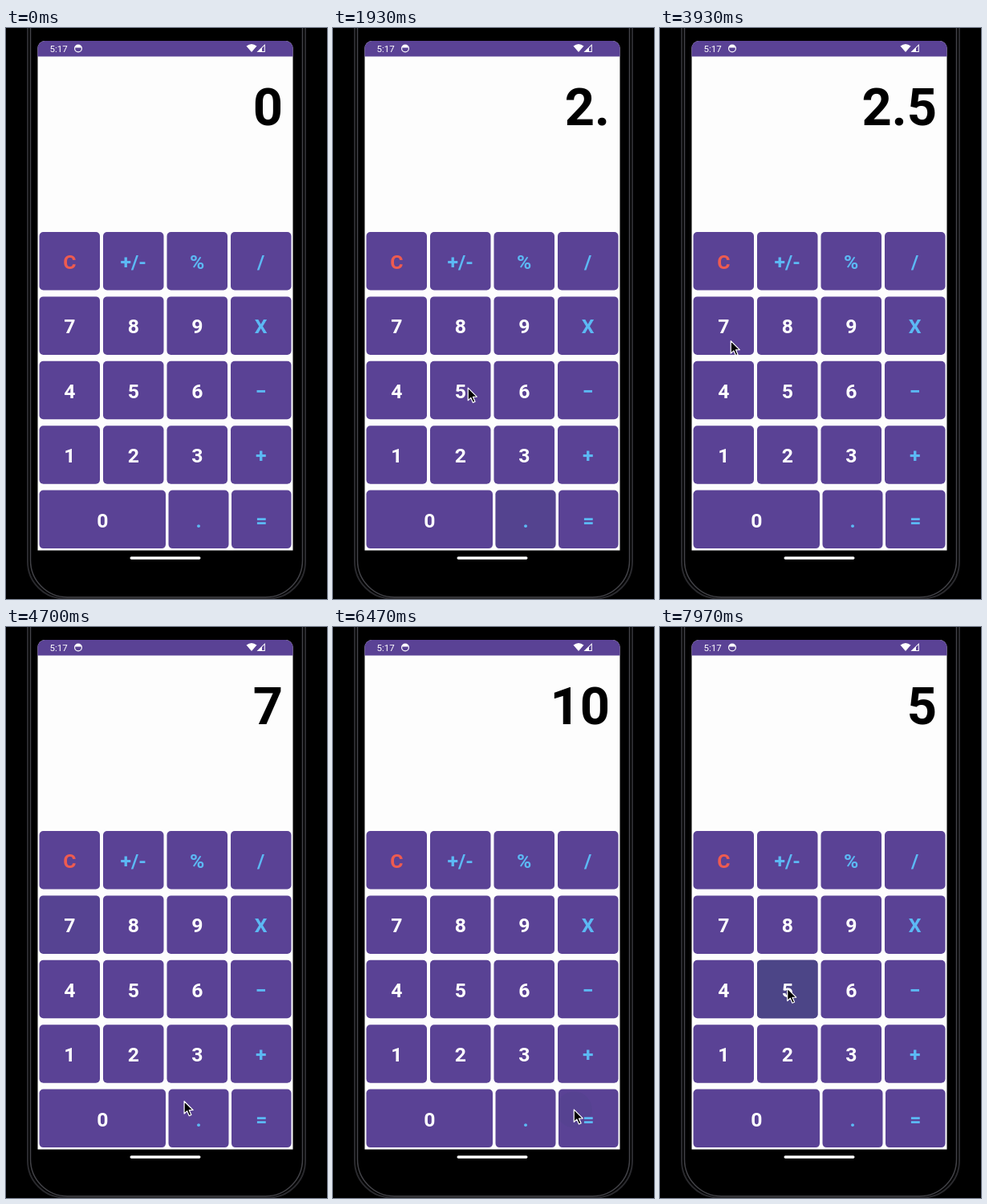
An HTML page with a canvas for the animation above (8000 ms loop, 400 by 711 pixels).

```html
<!DOCTYPE html>
<html lang="en">
<head>
<meta charset="utf-8">
<title>Calculator</title>
<style>
html, body { margin: 0; width: 100%; height: 100%; overflow: hidden; background: #000; }
canvas { display: block; width: 400px; height: 711px; }
</style>
</head>
<body>
<canvas id="stage"></canvas>
<script>
const W = 400, H = 711, LOOP = 8000;
const FONT = 'Roboto, "Open Sans", sans-serif';
const PURPLE = '#5a4295', PRESSED = '#4c4587', PAPER = '#fdfdfd';
const WHITE = '#fff', BLUE = '#5cb9f4', RED = '#ee5b50';

const canvas = document.getElementById('stage');
const dpr = window.devicePixelRatio || 1;
canvas.width = W * dpr;
canvas.height = H * dpr;
const ctx = canvas.getContext('2d');

const clamp = v => Math.max(0, Math.min(1, v));
const ease = v => v * v * (3 - 2 * v);

// Keypad
const keys = {};
function addKey(label, x, row, w) {
  const color = label === 'C' ? RED : /\d/.test(label) ? WHITE : BLUE;
  const y = 254 + row * 80.4, h = 72.5;
  keys[label] = { label, x, y, w, h, color, cx: x + w / 2, cy: y + h / 2 };
}
['C +/- % /', '7 8 9 X', '4 5 6 −', '1 2 3 +'].forEach((row, r) =>
  row.split(' ').forEach((label, c) => addKey(label, 41.5 + c * 79.5, r, 75.5)));
addKey('0', 41.5, 4, 157.5);
addKey('.', 202.5, 4, 75);
addKey('=', 281, 4, 74.5);

// Pointer stops: time, key, offset from the key's centre
function stop(at, label, dx, dy, hover = false) {
  const { cx, cy } = keys[label];
  return { at, label, x: cx + dx, y: cy + dy, hover };
}
const stops = [
  stop(0, '0', 100, 105, true),
  stop(900, '2', 9, 7),
  stop(1480, '.', -5, -9),
  stop(2150, '5', 9, -4),
  stop(3370, '+', 4, -2),
  stop(4200, '7', 9, 19),
  stop(5020, '.', -13, -14),
  stop(5930, '5', 7, -2),
  stop(6430, '=', -18, -11),
  stop(7200, '6', 32, 12, true),
  stop(7700, '5', 0, -1)
];
const taps = stops.filter(s => !s.hover);

// Run the calculator once to learn what each tap shows
let shown = '0', sum = 0, fresh = true;
for (const tap of taps) {
  if (tap.label === '+') sum += Number(shown);
  else if (tap.label === '=') shown = String(sum + Number(shown));
  else shown = fresh ? tap.label : shown + tap.label;
  fresh = tap.label === '+' || tap.label === '=';
  tap.shown = shown;
}

// Rest briefly after a stop, then travel for a share of the gap
function pointerAt(t) {
  const i = stops.findLastIndex(s => s.at <= t);
  const a = stops[i], b = stops[i + 1] || a;
  const k = ease(clamp((t - a.at - 100) / (0.55 * (b.at - a.at) || 1)));
  return { x: a.x + (b.x - a.x) * k, y: a.y + (b.y - a.y) * k };
}

function box(x, y, w, h, r, fill) {
  ctx.beginPath();
  ctx.roundRect(x, y, w, h, r);
  ctx.fillStyle = fill;
  ctx.fill();
}

function poly(points, fill) {
  ctx.beginPath();
  points.forEach(([x, y]) => ctx.lineTo(x, y));
  ctx.closePath();
  ctx.fillStyle = fill;
  ctx.fill();
}

function text(s, x, y, size, weight, color, align) {
  ctx.font = `${weight} ${size}px ${FONT}`;
  ctx.textAlign = align;
  ctx.fillStyle = color;
  ctx.fillText(s, x, y);
}

function shell(inset, color, width) {
  ctx.beginPath();
  ctx.roundRect(inset, -60, W - 2 * inset, 784 - inset / 2, 46);
  ctx.strokeStyle = color;
  ctx.lineWidth = width;
  ctx.stroke();
}

function drawPhone() {
  ctx.fillStyle = '#000';
  ctx.fillRect(0, 0, W, H);
  shell(27, '#2a2a2e', 2);
  shell(30.5, '#424247', 1.5);
  box(39.5, 16, 318, 634.5, [9, 9, 0, 0], PAPER);
  box(39.5, 16, 318, 19.5, [9, 9, 0, 0], PURPLE);
  box(154.5, 658.3, 88, 3.4, 1.7, WHITE);
}

function drawStatus() {
  text('5:17', 54.5, 30, 11.5, 400, WHITE, 'left');
  ctx.beginPath();
  ctx.arc(90, 25.5, 4.4, 0, 2 * Math.PI);
  ctx.strokeStyle = WHITE;
  ctx.lineWidth = 1.2;
  ctx.stroke();
  ctx.beginPath();
  ctx.arc(90, 25.5, 4.4, 1.08 * Math.PI, 1.92 * Math.PI);
  ctx.fillStyle = WHITE;
  ctx.fill();
  ctx.beginPath();
  ctx.moveTo(306, 30);
  ctx.lineTo(299.5, 22.5);
  ctx.quadraticCurveTo(306, 17.5, 312.5, 22.5);
  ctx.fill();
  poly([[312.5, 30], [322.8, 20], [322.8, 30]], WHITE);
  poly([[319, 25], [321.8, 22.3], [321.8, 29], [319, 29]], PURPLE);
}

function drawRipple(key, tap, age) {
  ctx.save();
  ctx.globalAlpha = Math.min(clamp(age / 150), clamp((560 - age) / 260));
  ctx.beginPath();
  ctx.roundRect(key.x, key.y, key.w, key.h, 5);
  ctx.clip();
  ctx.beginPath();
  ctx.arc(tap.x, tap.y, 95 * ease(clamp(0.15 + age / 240)), 0, 2 * Math.PI);
  ctx.fillStyle = PRESSED;
  ctx.fill();
  ctx.restore();
}

function drawKey(key, t) {
  box(key.x, key.y, key.w, key.h, 5, PURPLE);
  for (const tap of taps) {
    const age = t - tap.at;
    if (tap.label === key.label && age > 0 && age < 560) drawRipple(key, tap, age);
  }
  text(key.label, key.cx, key.cy + 9.7, 24.8, 700, key.color, 'center');
}

function drawPointer({ x, y }) {
  ctx.save();
  ctx.translate(x, y);
  poly([[0, 0], [0, 15.5], [3.6, 12.2], [6.2, 18.2], [8.8, 17], [6.2, 11.2], [11, 11]], '#000');
  ctx.strokeStyle = WHITE;
  ctx.lineWidth = 1.2;
  ctx.lineJoin = 'round';
  ctx.stroke();
  ctx.restore();
}

function draw(t) {
  ctx.setTransform(dpr, 0, 0, dpr, 0, 0);
  drawPhone();
  drawStatus();
  const last = taps.findLast(tap => tap.at <= t);
  text(last ? last.shown : '0', 345, 121, 65, 700, '#000', 'right');
  Object.values(keys).forEach(key => drawKey(key, t));
  drawPointer(pointerAt(t));
}

let origin = null;
function tick(now) {
  origin ??= now;
  draw((now - origin) % LOOP);
  requestAnimationFrame(tick);
}
requestAnimationFrame(tick);
</script>
</body>
</html>
```
